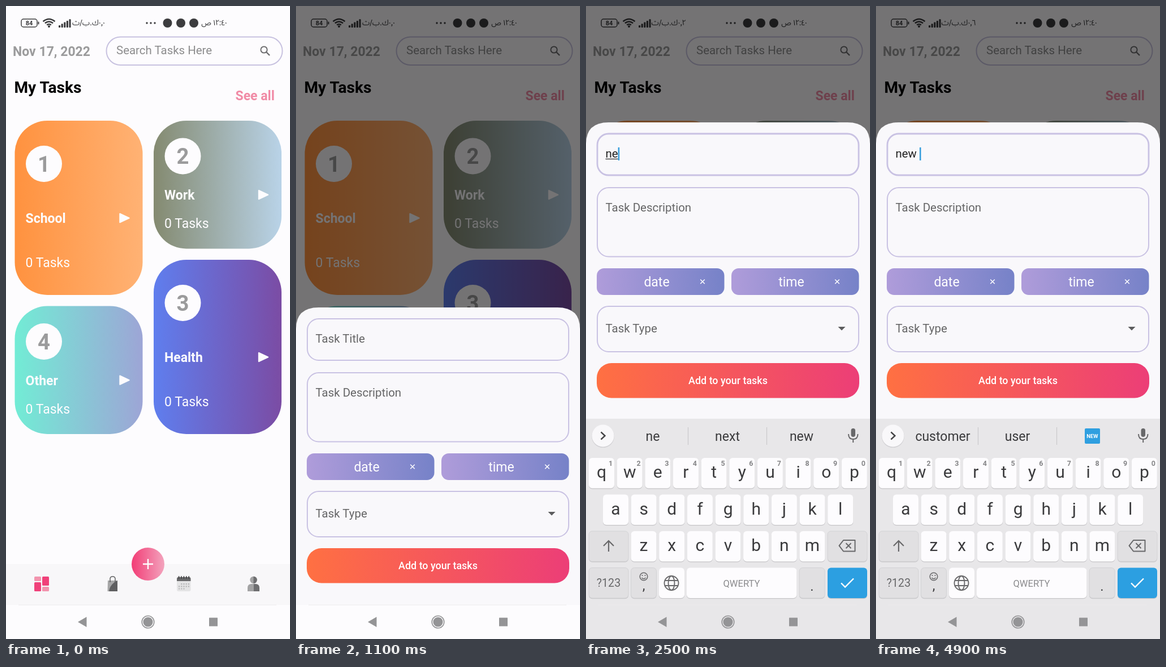
Write an HTML page that moves like this. It is 502 px wide and 1115 px high and loops after 5000 ms.

```html
<!DOCTYPE html>
<html lang="en">
<head>
<meta charset="utf-8">
<title>Task planner</title>
<style>
html, body { margin: 0; width: 100%; height: 100%; overflow: hidden; background: #fdfcfe; }
svg { display: block; width: 100%; height: 100%; font-family: Roboto, "Noto Sans", sans-serif; }
.ar { font-family: "Noto Sans Arabic", "DejaVu Sans", sans-serif; direction: rtl; }
</style>
</head>
<body>
<svg id="stage" viewBox="0 0 502 1115" xmlns="http://www.w3.org/2000/svg"></svg>
<script>
const LOOP = 5000, STEP = 100;
const NAV_TOP = 1055, SHEET_H = 524, KEYS_H = 328, LIFT = 326;

// ---------- markup helpers ----------
const rect = (x, y, w, h, r, fill, extra = '') =>
  `<rect x="${x}" y="${y}" width="${w}" height="${h}" rx="${r}" fill="${fill}" ${extra}/>`;
const circle = (x, y, r, fill, extra = '') =>
  `<circle cx="${x}" cy="${y}" r="${r}" fill="${fill}" ${extra}/>`;
const path = (d, fill, extra = '') => `<path d="${d}" fill="${fill}" ${extra}/>`;
const line = (d, color, w, extra = '') =>
  path(d, 'none', `stroke="${color}" stroke-width="${w}" ${extra}`);
const text = (s, x, y, size, fill, extra = '') =>
  `<text x="${x}" y="${y}" font-size="${size}" fill="${fill}" ${extra}>${s}</text>`;
const gradient = (id, a, b) =>
  `<linearGradient id="${id}"><stop stop-color="${a}"/><stop offset="1" stop-color="${b}"/></linearGradient>`;
const MID = 'text-anchor="middle"', BOLD = 'font-weight="700"';
const ROUND = 'stroke-linecap="round" stroke-linejoin="round"';

const defs = '<defs>' +
  gradient('school', '#ff923f', '#ffb274') +
  gradient('work', '#848a70', '#b9d3e8') +
  gradient('health', '#5f7eee', '#7b4ca4') +
  gradient('other', '#72ecd5', '#9da5d6') +
  gradient('fab', '#f23d76', '#f3a3bd') +
  gradient('pill', '#af9cda', '#7682c8') +
  gradient('submit', '#ff7042', '#ec3e77') + '</defs>';

// ---------- status bar ----------
function statusBar() {
  const ink = '#3c3c3e';
  let s = rect(27, 23, 28, 14, 4, 'none', `stroke="${ink}" stroke-width="1.5"`) +
    rect(56.5, 27.5, 2, 5, 1, ink) +
    text('84', 41, 34, 11, ink, MID + BOLD);
  for (const r of [5, 9.5, 14]) {
    const k = r * 0.75, y = 37 - r;
    s += line(`M${76 - k} ${y + r * 0.3}Q76 ${y - r * 0.3} ${76 + k} ${y + r * 0.3}`, ink, 2.6);
  }
  s += circle(76, 36, 2, ink);
  for (let i = 0; i < 5; i++) {
    const h = 4 + i * 2.7;
    s += rect(93 + i * 4.6, 38 - h, 3.2, h, 1, ink);
  }
  s += text('', 146, 34, 13.5, ink, 'id="speed" class="ar" ' + MID);
  for (let i = 0; i < 3; i++) s += circle(249 + i * 7, 30, 1.7, ink);
  s += circle(285.5, 30, 8, ink) + circle(309, 30, 8, ink) + circle(332, 30, 8, ink);
  return s + text('١٢:٤٠ ص', 368, 34, 13.5, ink, 'class="ar" ' + MID);
}

// ---------- home page ----------
function card(n, name, fill, x, y, h) {
  const tall = h > 250;
  const cy = y + (tall ? 76 : 62.5), nameY = y + (tall ? 180 : 139), countY = y + (tall ? 258 : 189);
  const px = x + 186, py = nameY - 17;
  return rect(x, y, 226, h, 57.5, `url(#${fill})`) +
    circle(x + 51.5, cy, 32, '#fdfcfe') +
    text(n, x + 51.5, cy + 13.5, 38.3, '#9b9b9c', MID + BOLD) +
    text(name, x + 19, nameY, 23, '#fdfcfe', BOLD) +
    path(`M${px} ${py + 1}V${py + 16}L${px + 16} ${py + 8.5}Z`, '#fdfcfe', `stroke="#fdfcfe" stroke-width="2.4" ${ROUND}`) +
    text('0 Tasks', x + 19, countY, 23, '#fdfcfe');
}

function tabIcons() {
  let s = rect(50, 1005, 12, 8, 1.5, '#f294ae') + rect(50, 1015, 12, 16, 1.5, '#f0417a') +
    rect(64, 1005, 12, 16, 1.5, '#f0417a') + rect(64, 1023, 12, 8, 1.5, '#f294ae');
  // bag
  s += path('M180 1012H197V1031H179.5Z', '#a6a6a7') +
    path('M197 1012V1031H182Q184 1018 197 1012Z', '#5f5f61') +
    line('M184 1015V1009Q184 1005 188.5 1005Q193 1005 193 1009V1015', '#5f5f61', 1.5);
  // calendar
  s += rect(302, 1006, 24.5, 25, 3, '#e4e4e5') + path('M302 1013V1009Q302 1006 305 1006H323.5Q326.5 1006 326.5 1009V1013Z', '#69696b');
  for (let i = 0; i < 5; i++) s += rect(304.8 + i * 4.4, 1004, 1.6, 5, 0.8, '#3f3f41');
  for (let i = 0; i < 14; i++) {
    if (i && i !== 13) s += rect(305 + i % 5 * 4.2, 1017 + (i / 5 | 0) * 4.2, 2.2, 2.2, 0.5, '#b4b4b6');
  }
  // profile
  return s + circle(437.5, 1011, 6.2, '#a3a3a4') + path('M437.5 1004.8A6.2 6.2 0 0 1 437.5 1017.2Z', '#6e6e70') +
    path('M427 1031V1025Q427 1018 434 1018H437.5V1031Z', '#a3a3a4') +
    path('M437.5 1018H441Q448 1018 448 1025V1031H437.5Z', '#6e6e70');
}

function home() {
  return rect(0, 0, 502, 1115, 0, '#fdfcfe') + statusBar() +
    text('Nov 17, 2022', 12, 88, 23, '#9b9b9c', BOLD) +
    rect(177.5, 54.5, 311, 49.5, 24.7, 'none', 'stroke="#c8c2e0" stroke-width="2"') +
    text('Search Tasks Here', 195, 85, 20.45, '#8c8c8d') +
    circle(456, 77, 5.6, 'none', 'stroke="#6e6e70" stroke-width="2"') + line('M460 81L466 87', '#6e6e70', 2.4) +
    text('My Tasks', 14.5, 153, 28.1, '#000', BOLD) +
    text('See all', 405.5, 166, 23, '#f18ba6', BOLD) +
    card(1, 'School', 'school', 15.5, 202, 307) +
    card(2, 'Work', 'work', 261, 202, 225.5) +
    card(3, 'Health', 'health', 261, 447, 307) +
    card(4, 'Other', 'other', 15.5, 528.5, 225.5) +
    rect(0, 983, 502, 72, 0, '#f8f7f9') + tabIcons() +
    circle(251, 983, 29, 'url(#fab)') + line('M242 983H260M251 974V992', '#fff', 2.4);
}

// ---------- task form ----------
function field(y, h, extra = '') {
  return rect(20, y, 462, h, 20, 'none', `stroke="#c9c2e3" stroke-width="2" ${extra}`);
}

function pill(x, label) {
  const cx = x + 187;
  return rect(x, 257, 225.5, 47, 13, 'url(#pill)') +
    text(label, x + 106, 289, 23, '#fff', MID) +
    line(`M${cx - 3.8} 276.7l7.6 7.6m0 -7.6l-7.6 7.6`, '#fff', 1.5);
}

function form() {
  const label = (s, y) => text(s, 34.5, y, 20.45, '#656566');
  return path('M0 1100V38Q0 0 40 0H462Q502 0 502 38V1100Z', '#f9f8fb') +
    field(20, 73, 'id="titleBox"') +
    text('', 34.5, 62, 20.45, '#656566', 'id="title"') +
    line('', '#333', 1.3, 'id="underline"') +
    rect(34, 44, 2.6, 23, 0.5, '#3a9fdd', 'id="caret"') +
    field(115, 121.5) + label('Task Description', 157) +
    pill(19, 'date') + pill(257, 'time') +
    field(324, 80) + label('Task Type', 370) + path('M445.5 360H458.5L452 366.5Z', '#5c5c5e') +
    rect(19, 424, 464, 61.5, 26, 'url(#submit)') +
    text('Add to your tasks', 251, 461, 17.9, '#fff', MID + 'font-weight="500"');
}

// ---------- keyboard, drawn from its own top edge ----------
const WHITE = '#fdfcfe', GREY = '#e1e0e2', PRESSED = '#cac8cb';
const PITCH = 49.65, ROW = 64.5, KEY_W = 45;
const rowY = r => 69 + r * ROW;

function key(x, r, w, fill, extra = '') {
  const y = rowY(r);
  return rect(x, y + 1.3, w, 53.5, 6, '#c6c5c8') +
    rect(x, y, w, 53.5, 6, fill, fill === GREY ? 'stroke="#cfced1" stroke-width="0.8" ' + extra : extra);
}

function keyboard() {
  const ink = '#3b3b3d', soft = '#68686a';
  let s = rect(0, 0, 502, 400, 0, '#e8e7e9') +
    circle(30, 31, 20, '#d2d1d4') + circle(30, 30, 19.6, '#f9f8fa') +
    line('M26.5 23.5L33.5 30L26.5 36.5', '#444446', 2.4) +
    line('M180.5 15V46M319.5 15V46', '#c9c8cb', 1.2);
  [118, 250, 381].forEach((x, i) => s += text('', x, 39, 23, ink, `id="hint${i}" ${MID}`));
  s += '<g id="badge">' + rect(369, 17, 27, 27, 2, '#2f9fe0') +
    text('NEW', 382.5, 34.2, 9.5, '#fff', MID + BOLD) + '</g>';
  s += rect(468.5, 17, 7.5, 15, 3.7, soft) +
    line('M464 27Q464 36 472.2 36Q480.5 36 480.5 27M472.2 36V42', soft, 2);

  [['qwertyuiop', 5], ['asdfghjkl', 30], ['zxcvbnm', 79.5]].forEach(([row, x0], r) => {
    [...row].forEach((c, i) => {
      const x = x0 + i * PITCH;
      s += key(x, r, KEY_W, WHITE) + text(c, x + 22.5, rowY(r) + 35, 30, ink, MID);
      if (!r) s += text((i + 1) % 10, x + 38.5, rowY(0) + 13.5, 12.5, '#858587', MID + BOLD);
    });
  });

  s += key(5, 2, 70, GREY) + line('M40 234V215M31 224L40 215L49 224', soft, 2.2) +
    key(427, 2, 70, GREY, 'id="del"') +
    line('M455 214H475.5V233.5H455L447.5 223.7Z', soft, 2, ROUND) +
    line('M459.5 219.2l9 9m0 -9l-9 9', soft, 2);

  s += key(5, 3, 70, GREY) + text('?123', 40, 296, 19.6, soft, MID) +
    key(79.5, 3, KEY_W, GREY) + circle(102, 278, 6.8, 'none', `stroke="${soft}" stroke-width="1.5"`) +
    circle(99.5, 276, 1.1, soft) + circle(104.5, 276, 1.1, soft) +
    line('M98.5 280Q102 284 105.5 280', soft, 1.3) + text(',', 102, 302, 24, ink, MID) +
    key(129, 3, KEY_W, WHITE);
  const wire = `stroke="${soft}" stroke-width="1.9"`;
  s += circle(151, 289.5, 12.5, 'none', wire) +
    `<ellipse cx="151" cy="289.5" rx="5.5" ry="12.5" fill="none" ${wire}/>` +
    line('M139.5 285H162.5M139.5 294H162.5', soft, 1.9) +
    key(178, 3, 194.5, WHITE) + text('QWERTY', 275, 295.5, 16.6, '#8b8b8d', MID) +
    key(377, 3, KEY_W, GREY) + text('.', 399.5, 303, 24, ink, MID) +
    key(427, 3, 70, '#2c9fe1') + line('M451 289.5L458 296.5L473 281.5', '#fff', 2.4);
  return s;
}

function systemNav() {
  const ink = '#949496';
  return rect(0, NAV_TOP, 502, 60, 0, '#fdfcfe', 'id="nav"') +
    line('M22 1055H478', '#ecebed', 1) +
    path('M127 1085L142.5 1076V1094Z', ink) +
    circle(251, 1085, 10.8, 'none', `stroke="${ink}" stroke-width="1.6"`) + circle(251, 1085, 8.6, ink) +
    rect(359, 1077.5, 15, 15, 0.5, ink);
}

document.getElementById('stage').innerHTML = defs + home() +
  rect(0, 0, 502, NAV_TOP, 0, '#000', 'id="scrim"') +
  `<g id="sheet">${form()}</g><g id="keys">${keyboard()}</g>` + systemNav();

// ---------- motion ----------
const $ = id => document.getElementById(id);
const set = (id, name, value) => $(id).setAttribute(name, value);
const show = (id, on) => set(id, 'visibility', on ? 'visible' : 'hidden');
const clamp = v => Math.min(1, Math.max(0, v));

function bezier(x1, y1, x2, y2) {
  const at = (a, b, s) => 3 * (1 - s) * (1 - s) * s * a + 3 * (1 - s) * s * s * b + s * s * s;
  return x => {
    let lo = 0, hi = 1;
    for (let i = 0; i < 24; i++) {
      const m = (lo + hi) / 2;
      if (at(x1, x2, m) < x) lo = m; else hi = m;
    }
    return at(y1, y2, (lo + hi) / 2);
  };
}
const decelerate = bezier(0, 0, 0.2, 1);
const ease = bezier(0.25, 0.1, 0.25, 1);

const FOCUS = 1700, NEXT = ['ne', 'next', 'new'];
// time, typed text, caret x, suggestions
const typing = [
  [FOCUS, '', 34, []],
  [2300, 'n', 45.5, []],
  [2400, 'ne', 56.6, NEXT],
  [3000, 'nee', 67.5, NEXT],
  [3400, 'ne', 56.6, NEXT],
  [4500, 'new ', 77, ['customer', 'user', '']]
];

function draw(t) {
  const open = clamp((t - 273) / 270);
  const rise = ease(clamp((t - 1950) / 250));
  const top = NAV_TOP - SHEET_H * decelerate(open) - LIFT * rise;
  show('sheet', open > 0);
  set('sheet', 'transform', `translate(0 ${top.toFixed(2)})`);
  set('scrim', 'opacity', open > 0 ? 0.54 * ease(open) : 0);
  set('keys', 'transform', `translate(0 ${NAV_TOP - KEYS_H * rise})`);
  set('nav', 'fill', t >= 2000 ? '#e8e7e9' : '#fdfcfe');

  const focused = t >= FOCUS;
  const [since, typed, caretX, hints] = typing.filter(e => e[0] <= t).pop() || typing[0];
  set('titleBox', 'stroke-width', focused ? 2.8 : 2);
  $('title').textContent = typed || 'Task Title';
  set('title', 'fill', typed ? '#222' : '#656566');
  const composing = typed && !typed.endsWith(' ');
  set('underline', 'd', composing ? `M34.5 64.5H${caretX}` : '');
  set('caret', 'x', caretX);
  set('caret', 'y', typed ? 44 : 46);
  set('caret', 'height', typed ? 23 : 20);
  set('caret', 'opacity', focused && (t - since) % 1000 < 500 ? 1 : 0);

  for (let i = 0; i < 3; i++) $('hint' + i).textContent = hints[i] || '';
  set('badge', 'opacity', composing || !typed ? 0 : 1);
  set('del', 'fill', t >= 3400 && t < 3600 ? PRESSED : GREY);

  const rate = t < 2200 ? '٠٫٠' : t < 4500 ? '٠٫٢' : '٠٫٦';
  $('speed').textContent = rate + 'ك.ب/ث';
}

const start = performance.now();
function tick() {
  const t = (performance.now() - start) % LOOP;
  draw(Math.floor(t / STEP) * STEP);
  requestAnimationFrame(tick);
}
tick();
</script>
</body>
</html>
```
